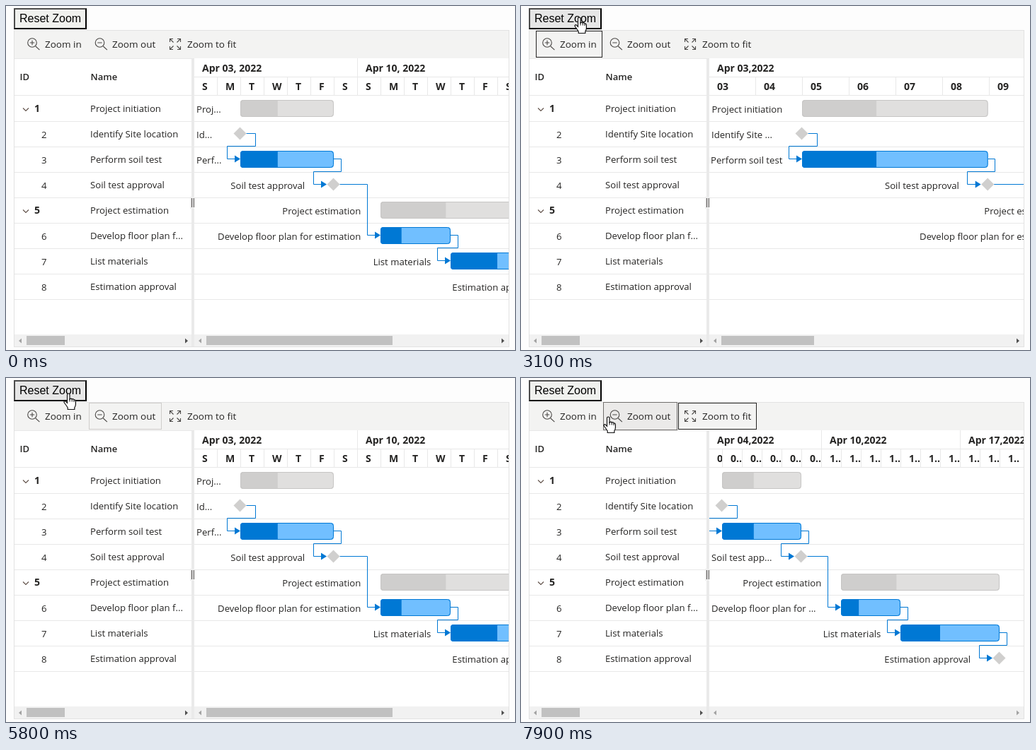
Recreate the animation shown at these times as an HTML page. Size 719 by 487 pixels, loop 8000 ms.

```html
<!DOCTYPE html>
<html lang="en">
<head>
<meta charset="utf-8">
<title>Gantt zoom</title>
<style>
  html, body { margin: 0; width: 100%; height: 100%; overflow: hidden; background: #fdfdfd; }
  svg { display: block; }
  text { font: 13.15px "Open Sans", "Noto Sans", sans-serif; fill: #252423; white-space: pre; }
  .bold { font-size: 14px; font-weight: 700; }
  .head { font-size: 13px; font-weight: 600; }
  .tool { font-size: 13.5px; }
  .tip { font-size: 11.7px; fill: #fff; }
  .reset { font: 16px "Liberation Sans", Arial, sans-serif; fill: #000; }
</style>
</head>
<body>
<svg id="stage" width="719" height="487" viewBox="0 0 719 487">
  <defs>
    <clipPath id="chartClip"><rect x="266" y="74" width="444" height="391"/></clipPath>
  </defs>
  <g id="frame"></g>
  <g id="tools"></g>
  <g id="chart" clip-path="url(#chartClip)"></g>
  <g id="scroll"></g>
  <g id="overlay"></g>
</svg>
<script>
const LOOP = 8000, STEP = 100;
const BLUE = '#0078d4', LINE = '#e8e8e8';
const $ = id => document.getElementById(id);

const text = (x, y, s, cls = '', anchor = 'start') =>
  `<text x="${x}" y="${y}" class="${cls}" text-anchor="${anchor}">${s}</text>`;
const rect = (x, y, w, h, fill, extra = '') =>
  `<rect x="${x}" y="${y}" width="${w}" height="${h}" fill="${fill}" ${extra}/>`;
const path = (d, stroke, fill = 'none', extra = '') =>
  `<path d="${d}" stroke="${stroke}" fill="${fill}" ${extra}/>`;
const hline = (x1, x2, y) => path(`M${x1} ${y}H${x2}`, LINE);
const vline = (x, y1, y2) => path(`M${x} ${y1}V${y2}`, LINE);
const mid = row => 109 + 36 * row;
const snap = x => Math.round(x) + .5;

const names = ['Project initiation', 'Identify Site location', 'Perform soil test',
  'Soil test approval', 'Project estimation', 'Develop floor plan for estimation',
  'List materials', 'Estimation approval'];

// Bars: row, first day after Apr 3, length in days, share done
const bars = [
  { row: 1, day: 2, len: 4, done: .4, parent: true },
  { row: 3, day: 2, len: 4, done: .4 },
  { row: 5, day: 8, len: 8, done: .35, parent: true },
  { row: 6, day: 8, len: 3, done: .3 },
  { row: 7, day: 11, len: 5, done: .4 }
];

const pad = n => String(n).padStart(2, '0');
const range = (n, f) => Array.from({ length: n }, (_, i) => f(i));

// origin: x of Apr 3; unit: day width; late and cut: start delay and shortening in days
const views = {
  day: {
    origin: 265, unit: 33, late: 0, cut: 0, thumb: 263,
    top: [[265, 'Apr 03, 2022'], [496, 'Apr 10, 2022']],
    cells: range(14, i => [265 + 33 * i, 'SMTWTFS'[i % 7]]),
    short: { 1: 'Proj...', 2: 'Id...', 3: 'Perf...' }
  },
  wide: {
    origin: 265, unit: 66, late: 0, cut: .02, thumb: 131,
    top: [[265, 'Apr 03,2022']],
    cells: range(7, i => [265 + 66 * i, pad(3 + i)]),
    short: { 2: 'Identify Site ...' }
  },
  week: {
    origin: 293, unit: 14, late: .36, cut: .5, thumb: 0,
    top: [[265, 'Apr 2022'], [685, 'May 2022']],
    cells: [[265, '0..'], ...range(4, i => [293 + 98 * i, pad(3 + 7 * i) + ' Apr']), [685, '01 May']],
    short: { 1: 'Pr...', 2: 'I...', 3: 'Pe...', 4: 'Soil test ...', 6: 'Develop floor pl...' }
  },
  fit: {
    origin: 228, unit: 28, late: 0, cut: 0, thumb: 0,
    top: [[265, 'Apr 04,2022'], [424, 'Apr 10,2022'], [620, 'Apr 17,2022']],
    cells: [[265, '0'], ...range(15, i => [284 + 28 * i, (i < 5 ? '0' : '1') + '..'])],
    short: { 1: '', 2: '', 3: '', 4: 'Soil test app...', 6: 'Develop floor plan for ...' }
  }
};

function drawBar(b, x, end) {
  const y = mid(b.row) - 12, split = x + (end - x) * b.done;
  const [base, fill, edge] = b.parent ? ['#e0dfde', '#cfcecd', '#c6c5c4'] : ['#71bfff', BLUE, BLUE];
  return rect(x, y, end - x, 24, base, 'rx="4"') +
    path(`M${split} ${y}H${x + 4}q-4 0 -4 4v16q0 4 4 4H${split}Z`, 'none', fill) +
    rect(x + .5, y + .5, end - x - 1, 23, 'none', `rx="4" stroke="${edge}"`);
}

const diamond = (x, row) =>
  path(`M${x} ${mid(row) - 9.5}l9 9l-9 9l-9 -9Z`, 'none', '#d0cfce');

function link(x1, row1, turn, row2, tip, straight) {
  const y1 = mid(row1) - .5, y2 = mid(row2) - .5;
  const bend = straight ? `H${snap(tip - 19)}` : `H${snap(turn)}V${y1 + 18}H${snap(tip - 19.5)}`;
  return path(`M${x1} ${y1}${bend}V${y2}H${tip - 7}`, BLUE) +
    path(`M${tip} ${y2}l-8 -5v10Z`, 'none', BLUE);
}

function drawChart(v) {
  const start = b => v.origin + (b.day + v.late) * v.unit;
  const end = b => start(b) + (b.len - v.cut) * v.unit;
  const [init, soil, est, plan, list] = bars;
  const mark = { 2: start(soil) - .5, 4: end(soil) - .5, 8: end(est) - .5 };

  let s = rect(266, 74, 444, 391, '#fff');
  s += hline(266, 710, 100.5) + hline(266, 710, 126.5);
  for (let r = 1; r <= 8; r++) s += hline(266, 710, mid(r) + 18.5);
  for (const [x, label] of v.top) s += vline(x + .5, 74, 100) + text(x + 12, 93, label, 'bold');
  for (const [x, label] of v.cells) s += vline(x + .5, 100, 126) + text(x + 12, 119, label, 'bold');

  s += link(mark[2] + 9, 2, mark[2] + 21, 3, start(soil));
  s += link(end(soil), 3, end(soil) + 9.5, 4, mark[4] - 9.5);
  s += link(mark[4] + 9, 4, 0, 6, start(plan), true);
  s += link(end(plan), 6, end(plan) + 9.5, 7, start(list));
  s += link(end(list), 7, end(list) + 9.5, 8, mark[8] - 9.5);

  for (const b of bars) s += drawBar(b, start(b), end(b));
  for (const row in mark) s += diamond(mark[row], +row);

  names.forEach((name, i) => {
    const row = i + 1, y = mid(row) + 5.6;
    if (row in v.short) s += text(269, y, v.short[row]);
    else {
      const bar = bars.find(b => b.row === row);
      s += text(bar ? start(bar) - 27.7 : mark[row] - 40.3, y, name, '', 'end');
    }
  });
  return s;
}

const arrow = (x, dir, on) =>
  path(`M${x + 2 * dir} 474l${-4 * dir} -3.5v7Z`, 'none', on ? '#505050' : '#a3a3a3');

function drawScroll(v) {
  let s = rect(12, 465, 250, 17, '#f1f1f1') + rect(266, 465, 444, 17, '#f1f1f1');
  s += rect(29, 467, 54, 13, '#c1c1c1') + arrow(20, -1, false) + arrow(255, 1, true);
  if (v.thumb) s += rect(283, 467, v.thumb, 13, '#c1c1c1');
  return s + arrow(274, -1, false) + arrow(702, 1, v.thumb > 0);
}

function drawFrame() {
  let s = rect(11.5, 34.5, 699, 448, '#fff', 'stroke="#e2e2e2"');
  s += rect(12, 35, 698, 39, '#f3f3f2') + hline(12, 710, 74.5) + hline(12, 262, 126.5);
  s += text(19.5, 105, 'ID', 'head') + text(119.5, 105, 'Name', 'head');
  names.forEach((name, i) => {
    const row = i + 1, y = mid(row) + 5, parent = row === 1 || row === 5;
    s += hline(12, 262, mid(row) + 18.5);
    s += parent ? text(40, y, row, 'bold') : text(50, y + .5, row);
    if (parent) s += path(`M24 ${mid(row) - .5}l4 4l4 -4`, '#605048', 'none', 'stroke-width="1.1"');
    s += text(119, y, row === 6 ? 'Develop floor plan f...' : name);
  });
  s += rect(262, 75, 4, 407, '#eaeaea') + rect(260, 270, 8, 17, '#f0f0f0');
  return s + path('M262.5 272V285M265.5 272V285', '#605e5c', 'none', 'stroke-width="1.3"');
}

const buttons = {
  in: { x: 20, w: 96, label: 'Zoom in', tx: 55 },
  out: { x: 116, w: 105, label: 'Zoom out', tx: 150 },
  fit: { x: 221, w: 113, label: 'Zoom to fit', tx: 256 }
};

function lens(x, plus) {
  const d = `M${x + 4.8} 57l5.6 5.2M${x - 3.2} 52h6.4` + (plus ? `M${x} 48.8v6.4` : '');
  return `<circle cx="${x}" cy="52" r="6.3" fill="none" stroke="#4a4846" stroke-width="1.1"/>` +
    path(d, '#4a4846', 'none', 'stroke-width="1.1"');
}

function corners() {
  const part = (sx, sy) =>
    `M${239 + 2.5 * sx} ${54 + 2.5 * sy}l${5 * sx} ${5 * sy}m${-4.5 * sx} 0h${4.5 * sx}v${-4.5 * sy}`;
  return path(part(1, 1) + part(-1, 1) + part(1, -1) + part(-1, -1), '#4a4846', 'none', 'stroke-width="1.1"');
}

// Keyboard focus rings: from, to, button, colour
const rings = [
  [1600, 3200, 'in', '#252423'],
  [3200, 3300, 'in', '#cfcdcb'],
  [4400, 5800, 'out', '#252423'],
  [5800, 5900, 'out', '#cfcdcb'],
  [6900, 8000, 'fit', '#252423']
];

function drawReset(pressed) {
  return rect(11, 3, 103, 30, '#000') + path('M11 33V3H114L112 5H13V31Z', 'none', '#4c4c4c') +
    rect(13, 5, 99, 26, pressed ? '#e6e6e6' : '#f0f1ee') + text(19, 23, 'Reset Zoom', 'reset');
}

function drawTools(t, pos) {
  let s = '';
  for (const key in buttons) {
    const b = buttons[key];
    const hover = pos && pos.y > 34 && pos.y < 74 && pos.x >= b.x && pos.x < b.x + b.w;
    const ring = rings.find(([from, to, k]) => k === key && t >= from && t < to);
    if (hover) s += rect(b.x + .5, 34.5, b.w - 1, 39, '#ebeae9', 'stroke="#706e6c"');
    if (ring) s += rect(b.x + 1.5, 35.5, b.w - 3, 37, 'none', `stroke="${ring[3]}"`);
    s += text(b.tx, 59, b.label, 'tool');
  }
  return s + lens(37, true) + lens(132.5, false) + corners() + drawReset(t === 3100 || t === 5800);
}

// Pointer stops: time, x, y
const stops = [
  [300, 700, 82], [400, 540, 86], [500, 379, 85], [700, 234, 88], [900, 177, 78],
  [1000, 120, 66], [1100, 89, 58], [2200, 90, 58], [2500, 84, 17], [3600, 84, 17],
  [3900, 167, 58], [4700, 167, 58], [5100, 90, 23], [6300, 90, 23], [6400, 115, 31],
  [6500, 165, 38], [6700, 270, 48], [7600, 270, 48], [7700, 215, 60],
  [7800, 150, 62], [7900, 125, 56], [8000, 125, 56]
];

function pointerAt(t) {
  if (t < stops[0][0]) return null;
  const i = stops.findIndex(s => s[0] > t);
  const [t0, x0, y0] = stops[i - 1], [t1, x1, y1] = stops[i];
  const k = (t - t0) / (t1 - t0);
  return { x: x0 + (x1 - x0) * k, y: y0 + (y1 - y0) * k };
}

const ARROW = path('M0 0V16.5L3.8 13L6.4 18.8L9 17.6L6.5 12H11.8Z', '#222', '#fff');
const HAND = path('M-3.5 1Q-3.5 -1 -1.7 -1Q0 -1 0 1V7Q2.3 5.4 3.2 7Q5.3 6 6 8Q8 7.5 8.4 10V14.5' +
    'Q8.2 17 6.8 18.8V21.5H-2.8V19Q-5 15.5 -8 11.5Q-8 9.2 -6 9.8L-3.5 12.3Z', '#111', '#fff', 'stroke-width="1.2"') +
  path('M0 6V10.5M3.2 7V10.5M6 8V11', '#111');

const drawPointer = (t, { x, y }) =>
  `<g transform="translate(${x} ${y})">${t < 1600 ? ARROW : HAND}</g>`;

function viewAt(t) {
  if (t >= 1500 && t < 3200) return 'wide';
  if (t >= 4300 && t < 5800) return 'week';
  return t >= 7100 ? 'fit' : 'day';
}

function render(t) {
  const view = views[viewAt(t)], pos = pointerAt(t);
  $('tools').innerHTML = drawTools(t, pos);
  $('chart').innerHTML = drawChart(view);
  $('scroll').innerHTML = drawScroll(view);
  let s = '';
  if (t >= 2000 && t < 2300) s += rect(99, 74, 59, 23, '#323130', 'rx="2"') + text(106, 90, 'Zoom in', 'tip');
  if (pos) s += drawPointer(t, pos);
  $('overlay').innerHTML = s;
}

$('frame').innerHTML = drawFrame();
const began = performance.now();
let last = -1;
function tick() {
  const t = Math.floor((performance.now() - began) % LOOP / STEP) * STEP;
  if (t !== last) render(last = t);
  requestAnimationFrame(tick);
}
tick();
</script>
</body>
</html>
```
